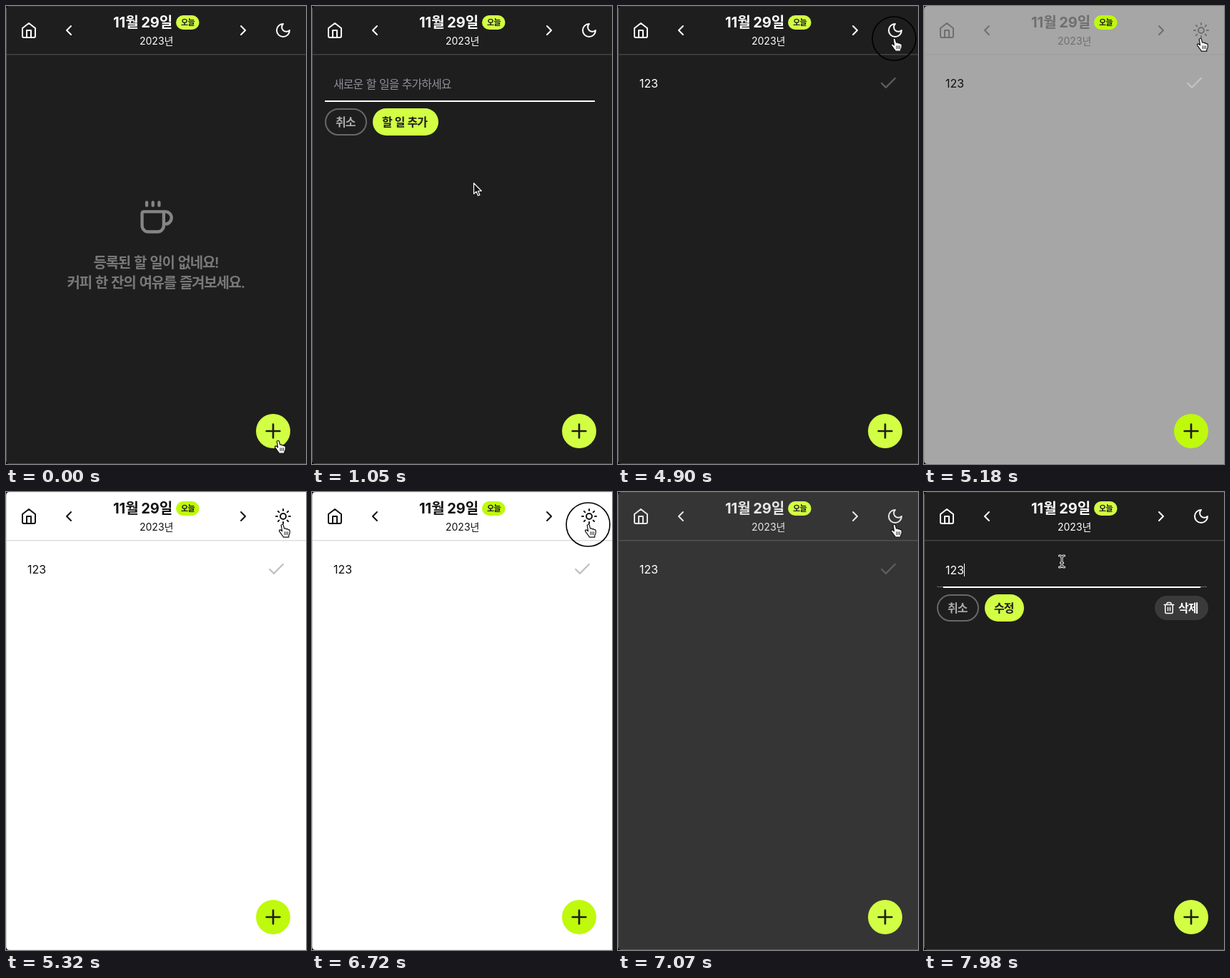
Write an HTML page with a canvas that moves like this. It is 420x640 px and loops after 8000 ms.

```html
<!DOCTYPE html>
<html lang="ko">
<head>
<meta charset="utf-8">
<title>할 일</title>
<style>
html, body { margin: 0; width: 100%; height: 100%; overflow: hidden; background: #1e1e1e; }
canvas { display: block; }
</style>
</head>
<body>
<canvas id="stage" width="420" height="640"></canvas>
<script>
const W = 420, H = 640, LOOP = 8000;
const c = document.getElementById('stage').getContext('2d');
const FONT = 'Inter, "Noto Sans CJK KR", "Noto Sans CJK", sans-serif';

const ICONS = {
  home: 'M3 9l9-7 9 7v11a2 2 0 0 1-2 2H5a2 2 0 0 1-2-2zM9 22V12h6v10',
  left: 'M15 18l-6-6 6-6',
  right: 'M9 18l6-6-6-6',
  moon: 'M12 3a6 6 0 0 0 9 9 9 9 0 1 1-9-9Z',
  sun: 'M16 12a4 4 0 1 1-8 0 4 4 0 0 1 8 0zM12 2v2M12 20v2M4.93 4.93l1.41 1.41M17.66 17.66l1.41 1.41M2 12h2M20 12h2M6.34 17.66l-1.41 1.41M19.07 4.93l-1.41 1.41',
  plus: 'M5 12h14M12 5v14',
  check: 'M20 6L9 17l-5-5',
  cup: 'M17 8V17a4 4 0 0 1-4 4H7a4 4 0 0 1-4-4V9a1 1 0 0 1 1-1h14a4 4 0 1 1 0 8h-1M6 2v2M10 2v2M14 2v2',
  trash: 'M3 6h18M19 6v14a2 2 0 0 1-2 2H7a2 2 0 0 1-2-2V6M8 6V4a2 2 0 0 1 2-2h4a2 2 0 0 1 2 2v2M10 11v6M14 11v6'
};
for (const k in ICONS) ICONS[k] = new Path2D(ICONS[k]);

const ARROW = new Path2D('M0 0V15L3.6 11.8 6 17.4 8.4 16.4 6 11H10.8Z');
const HAND = new Path2D('M-1.8 .4Q-.3-1.8 1.3 .2L2.6 5.2Q4.6 4.2 5.4 5.9 7.2 5.1 8 6.7 10 6.3 10.3 8.2V10.7Q10.3 12.7 8.8 15V17.2H1.2L.8 15.8Q-1.2 14-2.2 11.8L-4.4 8.8Q-5 7.1-3.2 6.9-1.9 7-.4 8.8Z');
const FOLDS = new Path2D('M3 9.7V13.7M5.2 9.7V13.7M7.4 9.7V13.7');
const IBEAM = new Path2D('M-3.5-8Q0-8 0-5.5 0-8 3.5-8M0-5.5V5.5M-3.5 8Q0 8 0 5.5 0 8 3.5 8M-1.5 2H1.5');

const clamp = v => Math.max(0, Math.min(1, v));
const part = (t, a, b) => clamp((t - a) / (b - a));
const smooth = p => p * p * (3 - 2 * p);
const out = p => 1 - (1 - p) ** 3;
const mix = (a, b, k) => a + (b - a) * k;
const gray = (a, b, k) => { const v = Math.round(mix(a, b, k)); return `rgb(${v},${v},${v})`; };

// Hangul is set slightly tighter than the font's own advance.
function text(s, x, y, size, weight, color) {
  c.font = `${weight} ${size}px ${FONT}`;
  c.fillStyle = color;
  for (const run of s.split(/([가-힣]+)/)) {
    if (!run) continue;
    c.letterSpacing = /[가-힣]/.test(run) ? -0.062 * size + 'px' : '0px';
    c.fillText(run, x, y);
    x += c.measureText(run).width;
  }
  c.letterSpacing = '0px';
  return x;
}

function icon(name, x, y, size, color) {
  const s = size / 24;
  c.save();
  c.translate(x - size / 2, y - size / 2);
  c.scale(s, s);
  c.lineWidth = 2;
  c.lineCap = c.lineJoin = 'round';
  c.strokeStyle = color;
  c.stroke(ICONS[name]);
  c.restore();
}

function pill(x, y, w, h, fill, border) {
  c.beginPath();
  c.roundRect(x, y, w, h, h / 2);
  if (fill) { c.fillStyle = fill; c.fill(); }
  if (border) { c.strokeStyle = border; c.lineWidth = 2; c.stroke(); }
}

function disc(x, y, r) {
  c.beginPath();
  c.arc(x, y, r, 0, 7);
}

function bar(x, y, w, h, color) {
  c.fillStyle = color;
  c.fillRect(x, y, w, h);
}

function header(k, light, lime) {
  const ink = gray(255, 17, k);
  bar(0, 67, W, 1.5, gray(66, 222, k));
  icon('home', 32, 34, 24, ink);
  icon('left', 88, 34, 24, ink);
  icon('right', 332, 34, 24, ink);
  icon(light ? 'sun' : 'moon', 388, 34, 24, ink);
  text('11월 29일', 150, 30, 20, 700, ink);
  text('2023년', 187, 53.5, 14, 400, ink);
  pill(238, 13, 32.5, 20, lime);
  text('오늘', 245, 27, 11, 600, '#1e1e1e');
}

function empty() {
  icon('cup', 210, 296, 52, '#858585');
  text('등록된 할 일이 없네요!', 122.5, 365.5, 20, 600, '#787878');
  text('커피 한 잔의 여유를 즐겨보세요.', 85.5, 393.5, 20, 600, '#787878');
}

function item(light, alpha) {
  c.globalAlpha = alpha;
  text('123', 30, 114, 16, 400, light ? '#111' : '#fff');
  icon('check', 378.5, 108, 28, light ? '#c2c2c2' : '#5e5e5e');
  c.globalAlpha = 1;
}

function form(t, start, value, caret, edit, lime) {
  const half = 189 * out(part(t, start, start + 330));
  bar(18, 132, 378, 1, '#6a6a6a');
  bar(207 - half, 132, half * 2, 2, '#fff');
  let x = 30;
  if (value) x = text(value, 30, 114.5, 16, 400, '#fff');
  else text('새로운 할 일을 추가하세요', 30, 114.5, 16, 400, '#918e99');
  if (caret) bar(Math.round(x), 100, 1, 18, '#fff');

  pill(19, 144, 57, 36, null, '#686868');
  text('취소', 33, 168, 16, 600, '#aaa');
  pill(85, 143, edit ? 55 : 92, 38, lime);
  text(edit ? '수정' : '할 일 추가', 98, 168, 16, 600, '#1e1e1e');
  if (edit) {
    pill(323, 145, 75, 34, '#3a3a3a');
    icon('trash', 343, 162, 18, '#fff');
    text('삭제', 356, 168, 16, 600, '#fff');
  }
}

// Pointer legs: start, end, from x, from y, to x, to y.
const LEGS = [
  [380, 960, 381, 608, 226.5, 247.5],
  [1820, 2380, 180, 214, 150.5, 164.5],
  [3140, 3920, 150.5, 164.5, 392, 49],
  [3950, 4270, 392, 49, 387, 46],
  [7130, 7430, 387, 46, 193, 97]
];

// Presses: start, end, x, y, ring radius.
const CLICKS = [
  [70, 230, 381, 607, 27],
  [2660, 2800, 150, 164, 28],
  [4900, 5010, 386.5, 45.5, 30.5],
  [6720, 6830, 386.5, 45.5, 30.5],
  [7630, 7770, 193, 96, 17]
];

function pointer(t) {
  if (t >= 1470 && t < 1820) return;
  let [, , x, y] = LEGS[0];
  for (const [a, b, x0, y0, x1, y1] of LEGS) {
    if (t < a) break;
    const k = smooth(part(t, a, b));
    x = mix(x0, x1, k);
    y = mix(y0, y1, k);
  }
  const onAdd = Math.hypot(x - 374, y - 594) < 24;
  const onButton = t > 1820 && t < 2800 && y < 181;
  const onTheme = x > 372 && y < 58;
  const onItem = t > 7130 && y > 84;

  c.save();
  c.translate(x, y);
  c.lineCap = c.lineJoin = 'round';
  if (t >= 7770) {
    c.strokeStyle = '#fff'; c.lineWidth = 3; c.stroke(IBEAM);
    c.strokeStyle = '#111'; c.lineWidth = 1.1; c.stroke(IBEAM);
  } else if (onAdd || onButton || onTheme || onItem) {
    c.fillStyle = '#fff'; c.strokeStyle = '#111'; c.lineWidth = 1.2;
    c.fill(HAND); c.stroke(HAND);
    c.lineWidth = 0.9; c.stroke(FOLDS);
  } else {
    c.fillStyle = '#141414'; c.strokeStyle = '#fff'; c.lineWidth = 1.2;
    c.fill(ARROW); c.stroke(ARROW);
  }
  c.restore();
}

function edges(k) {
  bar(0, 0, 1, H, gray(80, 205, k));
  bar(0, 0, W, 1, gray(48, 240, k));
  bar(0, H - 1, W, 1, gray(68, 240, k));
  c.fillStyle = '#000';
  for (const [y, d] of [[0, 1], [H, -1]]) {
    c.beginPath();
    c.moveTo(0, y);
    c.lineTo(5, y);
    c.quadraticCurveTo(0, y, 0, y + 5 * d);
    c.fill();
  }
}

function draw(t) {
  const k = smooth(part(t, 5010, 5310)) - smooth(part(t, 6830, 7130));
  const light = t >= 5010 && t < 6830;
  const lime = light ? '#bff90c' : '#d2ff44';

  bar(0, 0, W, H, gray(30, 255, k));
  header(k, light, lime);

  if (t < 380) empty();
  else if (t < 2800) {
    const typed = '123'.slice(0, t < 1470 ? 0 : t < 1540 ? 1 : t < 1680 ? 2 : 3);
    const since = t < 1470 ? t - 400 : t - 1680;
    form(t, 380, typed, since < 0 || since % 1000 < 500, false, lime);
  } else if (t < 7770) item(light, part(t, 2780, 2940));
  else form(t, 7770, '123', true, true, lime);

  disc(374, 594, 24);
  c.fillStyle = lime;
  c.fill();
  icon('plus', 374, 594, 32, '#1e1e1e');

  edges(k);
  for (const [a, b, x, y, r] of CLICKS) {
    if (t < a || t >= b) continue;
    disc(x, y, r);
    c.strokeStyle = '#000';
    c.lineWidth = 1.6;
    c.stroke();
  }
  pointer(t);
}

const began = performance.now();
function frame() {
  draw((performance.now() - began) % LOOP);
  requestAnimationFrame(frame);
}
frame();
</script>
</body>
</html>
```
